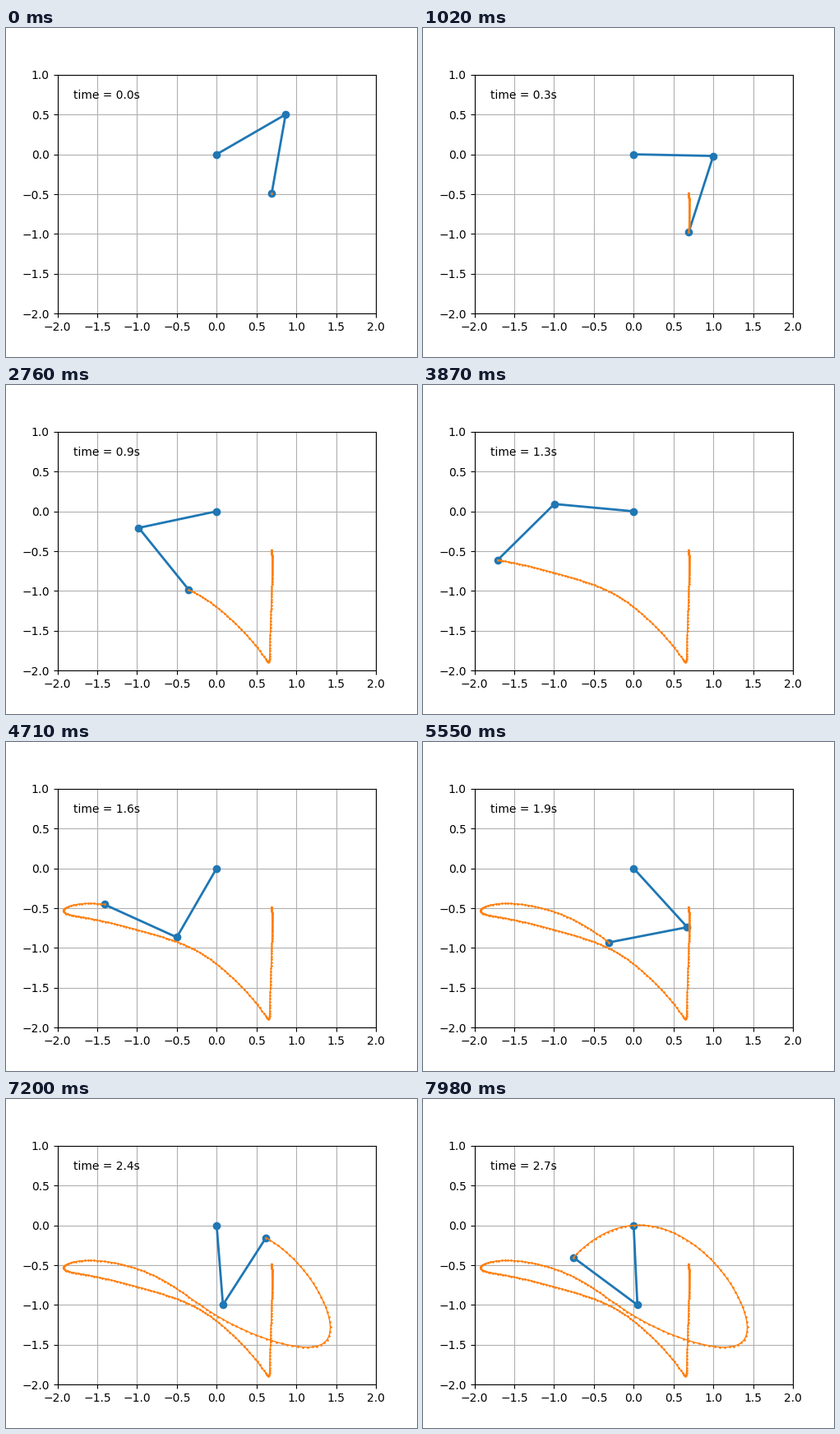
Animation of 500 by 400 pixels, one loop 8 s. Source, as a matplotlib script:

```python
import numpy as np
import matplotlib.pyplot as plt
from matplotlib.animation import FuncAnimation
from numpy import cos, sin

G = 9.8
L1 = L2 = 1.0
M1 = M2 = 1.0
DT = 0.01
FRAMES = 267
LOOP_MS = 8000


def derivs(state):
    """Rates of change of (angle 1, speed 1, angle 2, speed 2)."""
    a1, w1, a2, w2 = state
    delta = a2 - a1
    s, c = sin(delta), cos(delta)

    den1 = (M1 + M2) * L1 - M2 * L1 * c * c
    acc1 = (M2 * L1 * w1 * w1 * s * c
            + M2 * G * sin(a2) * c
            + M2 * L2 * w2 * w2 * s
            - (M1 + M2) * G * sin(a1)) / den1

    den2 = (L2 / L1) * den1
    acc2 = (-M2 * L2 * w2 * w2 * s * c
            + (M1 + M2) * G * sin(a1) * c
            - (M1 + M2) * L1 * w1 * w1 * s
            - (M1 + M2) * G * sin(a2)) / den2
    return np.array([w1, acc1, w2, acc2])


# Euler steps of the double pendulum, released from rest
states = np.empty((FRAMES, 4))
states[0] = np.radians([120.0, 0.0, -10.0, 0.0])
for i in range(1, FRAMES):
    states[i] = states[i - 1] + derivs(states[i - 1]) * DT

x1 = L1 * sin(states[:, 0])
y1 = -L1 * cos(states[:, 0])
x2 = x1 + L2 * sin(states[:, 2])
y2 = y1 - L2 * cos(states[:, 2])

fig = plt.figure(figsize=(5, 4), dpi=100)
ax = fig.add_subplot(autoscale_on=False, xlim=(-2, 2), ylim=(-2, 1))
ax.set_aspect("equal")
ax.grid()

rods, = ax.plot([], [], "o-", lw=2)
trace, = ax.plot([], [], ".-", lw=1, ms=2)
clock = ax.text(0.05, 0.9, "", transform=ax.transAxes)


def animate(i):
    rods.set_data([0, x1[i], x2[i]], [0, y1[i], y2[i]])
    trace.set_data(x2[:i + 1], y2[:i + 1])
    clock.set_text(f"time = {i * DT:.1f}s")
    return rods, trace, clock


anim = FuncAnimation(fig, animate, frames=FRAMES, interval=LOOP_MS / FRAMES,
                     blit=True, repeat=True, repeat_delay=0)
plt.show()
```
